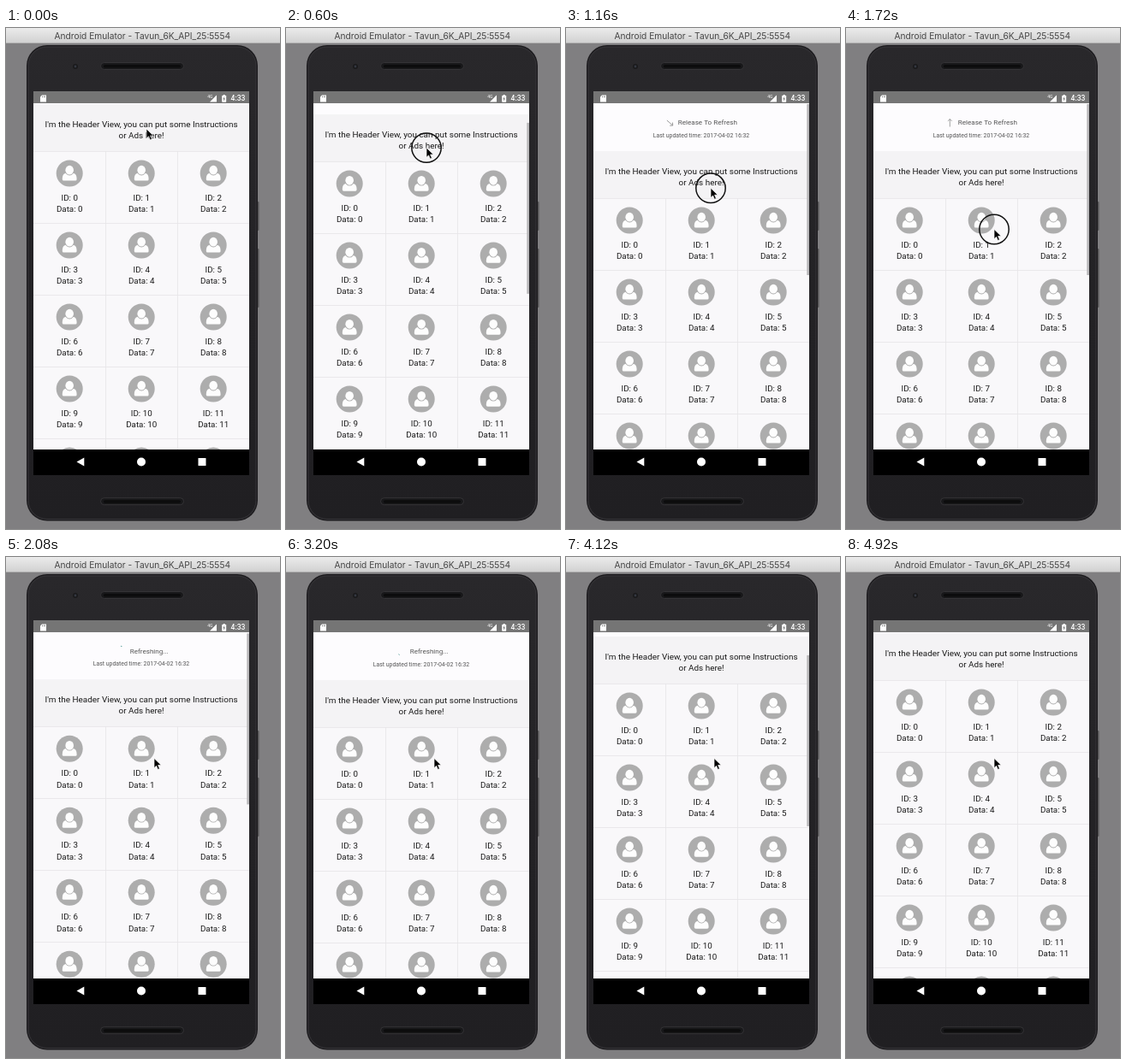
An HTML page with a canvas for the animation above (5.04 s loop, 320x586 px).

```html
<!DOCTYPE html>
<html lang="en">
<head>
<meta charset="utf-8">
<title>Pull to refresh</title>
<style>
  html, body { margin: 0; width: 100%; height: 100%; overflow: hidden; background: #807f81; }
  canvas { display: block; width: 320px; height: 586px; }
</style>
</head>
<body>
<canvas id="stage"></canvas>
<script>
const W = 320, H = 586, LOOP = 5040;
const PRESS = 360, ARMED = 1112, RELEASE = 1880, BACK = 3845, REST = 4320;
const PULL = 55, SLOP = 10;
const LEFT = 32, WIDE = 252, CELL = 84, MID = LEFT + WIDE / 2;
const BAR = 74, TOP = 88, NAV = 493, END = 523;
const INK = '#1a1a1a', SOFT = '#555';

const canvas = document.getElementById('stage');
const dpr = window.devicePixelRatio || 1;
canvas.width = W * dpr;
canvas.height = H * dpr;
const ctx = canvas.getContext('2d');

const clamp = (v, lo = 0, hi = 1) => Math.min(hi, Math.max(lo, v));
const span = (t, a, b) => clamp((t - a) / (b - a));
const smooth = p => p * p * (3 - 2 * p);

// Linear interpolation through [time, value] pairs.
function track(t, keys) {
  for (let i = 1; i < keys.length; i++) {
    const [t0, v0] = keys[i - 1], [t1, v1] = keys[i];
    if (t < t1) return v0 + (v1 - v0) * span(t, t0, t1);
  }
  return keys[keys.length - 1][1];
}

function rect(x, y, w, h, fill) {
  ctx.fillStyle = fill;
  ctx.fillRect(x, y, w, h);
}

function round(x, y, w, h, r, fill, stroke, width = 1) {
  ctx.beginPath();
  ctx.roundRect(x, y, w, h, r);
  if (fill) { ctx.fillStyle = fill; ctx.fill(); }
  if (stroke) { ctx.strokeStyle = stroke; ctx.lineWidth = width; ctx.stroke(); }
}

function disc(x, y, r, fill) {
  ctx.beginPath();
  ctx.arc(x, y, r, 0, Math.PI * 2);
  ctx.fillStyle = fill;
  ctx.fill();
}

function poly(points, fill) {
  ctx.beginPath();
  points.forEach(([x, y]) => ctx.lineTo(x, y));
  ctx.closePath();
  ctx.fillStyle = fill;
  ctx.fill();
}

function label(str, x, y, size, color, { align = 'center', family = 'Roboto', weight = 400 } = {}) {
  ctx.font = `${weight} ${size}px ${family}, sans-serif`;
  ctx.textAlign = align;
  ctx.fillStyle = color;
  ctx.fillText(str, x, y);
}

function vertical(y0, y1, ...colors) {
  const g = ctx.createLinearGradient(0, y0, 0, y1);
  colors.forEach((c, i) => g.addColorStop(i / (colors.length - 1), c));
  return g;
}

function drawSpeaker(y) {
  round(110.5, y, 97, 8, 4, '#18181a', '#343336');
  round(114, y + 2.5, 90, 3.5, 1.7, '#0c0c0d');
}

function drawPhone() {
  rect(0, 0, W, H, '#807f81');
  rect(0, 0, W, 18, vertical(0, 18, '#ebebeb', '#d0d0d0'));
  rect(0, 17.3, W, 0.7, '#a5a5a5');
  label('Android Emulator - Tavun_6K_API_25:5554', 159.3, 12.8, 10.2, '#464646', { family: 'Inter' });

  round(293.5, 203, 2, 34, 1, '#555456');
  round(293.5, 258, 2, 69, 1, '#555456');
  round(24, 20, 270, 556.5, 24, '#1d1c1f');
  round(26, 22, 266, 552.5, 22, vertical(22, 574, '#29282b', '#232225', '#201f22'), '#3d3c3f', 0.8);
  disc(81, 45, 3, '#1a1a1c');
  disc(81, 45, 1.4, '#343841');
  drawSpeaker(40.5);
  drawSpeaker(549.7);
}

function drawStatusBar() {
  rect(LEFT, BAR, WIDE, TOP - BAR, '#757575');
  poly([[42, 78.5], [47, 78.5], [47, 86.5], [40, 86.5], [40, 80.5]], '#fff');
  [42.2, 43.8, 45.3].forEach(x => rect(x, 79.5, 0.7, 1.8, '#757575'));
  poly([[246, 78.5], [246, 86.5], [238, 86.5]], '#fff');
  label('4G', 238.4, 82, 5, '#fff');
  round(252.2, 79, 5, 7.7, 0.6, '#fff');
  rect(253.7, 78, 2, 1.2, '#fff');
  poly([[255.3, 80], [253.3, 83.3], [254.5, 83.3], [254.1, 85.7], [256.1, 82.4], [254.9, 82.4]], '#757575');
  label('4:33', 279.5, 85.3, 8.6, '#fff', { align: 'right', weight: 500 });
}

function drawNavBar() {
  rect(LEFT, NAV, WIDE, END - NAV, '#000');
  poly([[82.5, 507.5], [91.3, 502.6], [91.3, 512.4]], '#fff');
  disc(MID, 507.5, 5, '#fff');
  round(224.5, 503, 9, 9, 0.6, '#fff');
}

function drawAvatar(x, y) {
  const gray = '#adadad', white = '#fdfdfd';
  disc(x, y, 15.5, gray);
  ctx.beginPath();
  ctx.moveTo(x - 8.4, y + 7);
  ctx.bezierCurveTo(x - 8.4, y + 2, x - 6.8, y - 0.2, x - 3.4, y - 0.2);
  ctx.lineTo(x + 3.4, y - 0.2);
  ctx.bezierCurveTo(x + 6.8, y - 0.2, x + 8.4, y + 2, x + 8.4, y + 7);
  ctx.quadraticCurveTo(x + 8.4, y + 8.6, x + 6.8, y + 8.6);
  ctx.lineTo(x - 6.8, y + 8.6);
  ctx.quadraticCurveTo(x - 8.4, y + 8.6, x - 8.4, y + 7);
  ctx.fillStyle = white;
  ctx.fill();
  ctx.beginPath();
  ctx.ellipse(x, y - 3.8, 4.8, 5.4, 0, 0, Math.PI * 2);
  ctx.strokeStyle = gray;
  ctx.lineWidth = 1.6;
  ctx.stroke();
  ctx.fill();
}

function drawArrow(x, y, angle) {
  ctx.save();
  ctx.translate(x, y);
  ctx.rotate(angle);
  ctx.beginPath();
  ctx.moveTo(0, -4.5);
  ctx.lineTo(0, 4.5);
  ctx.moveTo(-2.4, 2.1);
  ctx.lineTo(0, 4.5);
  ctx.lineTo(2.4, 2.1);
  ctx.strokeStyle = '#8c8c8c';
  ctx.lineWidth = 0.8;
  ctx.stroke();
  ctx.restore();
}

function drawSpinner(x, y, age) {
  const p = (age / 1333) % 1;
  const turn = -150 + age * 0.268;
  const tail = turn + 270 * smooth(clamp(p * 2 - 1));
  const head = turn + 270 * smooth(clamp(p * 2 - 0.25)) + 14;
  ctx.beginPath();
  ctx.arc(x, y, 4.8, tail * Math.PI / 180, head * Math.PI / 180);
  ctx.strokeStyle = '#3a8f88';
  ctx.lineWidth = 1;
  ctx.stroke();
}

function drawRefresh(t, offset) {
  const y = 34 + offset;
  if (t >= RELEASE) {
    drawSpinner(134.5, y + 21, t - RELEASE);
    label('Refreshing...', 167.2, y + 24.4, 8.1, SOFT);
  } else {
    drawArrow(121.3, y + 22, -Math.PI * span(t, ARMED, ARMED + 180));
    label(t >= ARMED ? 'Release To Refresh' : 'Pull To Refresh', 165.3, y + 24.4, 8.1, SOFT);
  }
  label('Last updated time: 2017-04-02 16:32', MID, y + 38.9, 6.9, SOFT);
}

function drawList(offset) {
  const top = 89 + offset;
  rect(LEFT, top, WIDE, 55, '#f4f3f5');
  label("I'm the Header View, you can put some Instructions", MID, top + 27, 9.95, INK);
  label('or Ads here!', MID, top + 40, 9.95, INK);
  for (let i = 0; i < 15; i++) {
    const x = LEFT + (i % 3) * CELL, y = top + 55 + Math.floor(i / 3) * CELL;
    const mid = x + CELL / 2;
    rect(x, y, CELL, CELL, '#f9f8fa');
    rect(x, y, CELL, 0.8, '#e6e5e8');
    if (i % 3) rect(x, y, 0.8, CELL, '#e6e5e8');
    drawAvatar(mid + 0.2, y + 26);
    label(`ID: ${i}`, mid + 0.2, y + 58, 9.8, INK);
    label(`Data: ${i}`, mid + 0.2, y + 71.3, 9.8, INK);
  }
}

function drawScrollbar(t, offset) {
  const first = span(t, 450, 490) * (1 - span(t, 2440, 2690));
  const second = span(t, BACK, BACK + 30) * (1 - span(t, 4700, 4920));
  ctx.globalAlpha = Math.max(first, second);
  rect(281.3, 117 - offset * 28 / PULL, 2.7, 200, '#b9b8ba');
  ctx.globalAlpha = 1;
}

function drawPointer(x, y, pressed) {
  if (pressed) {
    ctx.beginPath();
    ctx.arc(x, y, 17.2, 0, Math.PI * 2);
    ctx.strokeStyle = '#111';
    ctx.lineWidth = 1.5;
    ctx.stroke();
  }
  const shape = [[0, 0], [0, 11.2], [2.6, 8.8], [4.4, 13], [6.4, 12.1], [4.6, 8], [8.2, 7.9]]
    .map(([dx, dy]) => [x + dx, y + dy]);
  poly(shape, '#000');
  ctx.strokeStyle = '#fff';
  ctx.lineWidth = 0.7;
  ctx.stroke();
}

function pullOffset(t, y) {
  if (t >= BACK) return PULL * Math.pow(1 - span(t, BACK, REST), 3);
  if (t >= RELEASE && t < 3000) return PULL - 0.8;
  return clamp(y - 118 - SLOP, 0, PULL);
}

function render(t) {
  const px = track(t, [[0, 164], [600, 164], [1160, 169], [1720, 173]]);
  const py = track(t, [[0, 118], [PRESS, 118], [600, 140], [1160, 187.2], [1720, 235.5]]);
  const offset = pullOffset(t, py);

  ctx.setTransform(dpr, 0, 0, dpr, 0, 0);
  drawPhone();
  ctx.save();
  ctx.beginPath();
  ctx.rect(LEFT, TOP, WIDE, NAV - TOP);
  ctx.clip();
  rect(LEFT, TOP, WIDE, NAV - TOP, '#fdfcfe');
  drawRefresh(t, offset);
  drawList(offset);
  drawScrollbar(t, offset);
  ctx.restore();
  drawStatusBar();
  drawNavBar();
  drawPointer(px, py, t >= PRESS && t < RELEASE);
}

const start = performance.now();
function tick() {
  render((performance.now() - start) % LOOP);
  requestAnimationFrame(tick);
}
tick();
</script>
</body>
</html>
```
